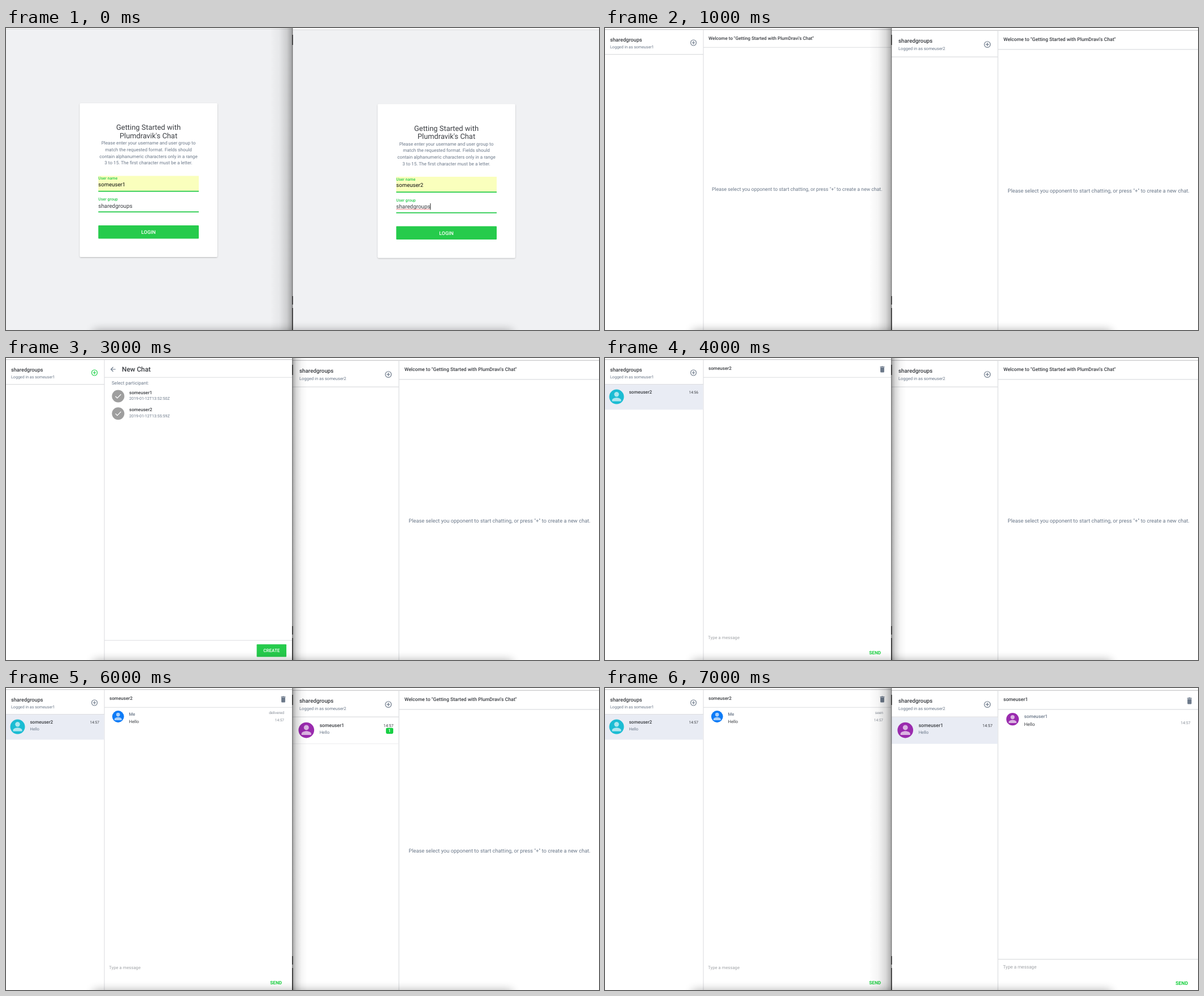
These frames come from a looping animation (1049 px wide and 534 px high, 8 s). An HTML page:

```html
<!DOCTYPE html>
<html lang="en">
<head>
<meta charset="utf-8">
<title>Two chat windows</title>
<style>
  html, body { margin: 0; width: 100%; height: 100%; overflow: hidden; background: #fff; }
  svg { display: block; width: 100vw; height: 100vh; }
  text { font-family: Roboto, Arial, sans-serif; text-rendering: geometricPrecision; white-space: pre; }
</style>
</head>
<body>
<svg id="stage" viewBox="0 0 1049 534" preserveAspectRatio="none">
  <defs>
    <linearGradient id="shade">
      <stop offset="0" stop-opacity="0"/>
      <stop offset=".4" stop-opacity=".04"/>
      <stop offset=".75" stop-opacity=".15"/>
      <stop offset="1" stop-opacity=".34"/>
    </linearGradient>
    <filter id="cardShadow" x="-10%" y="-10%" width="120%" height="120%">
      <feDropShadow dx="0" dy="1" stdDeviation="1" flood-opacity=".25"/>
    </filter>
    <filter id="soft" x="-10%" y="-150%" width="120%" height="400%">
      <feGaussianBlur stdDeviation="8"/>
    </filter>
  </defs>
</svg>
<script>
const LOOP = 8000;
const INK = '#3a3d42', SLATE = '#6b7889', GREEN = '#26cb4c', LINE = '#dcdde0';
const TEAL = '#1bbcd3', BLUE = '#0d7bf7', PURPLE = '#9a2bae';
const USERS = ['someuser1', 'someuser2'];
const GROUP = 'sharedgroups';
const stage = document.getElementById('stage');
const scenes = [];

function add(parent, tag, attrs = {}) {
  const el = document.createElementNS('http://www.w3.org/2000/svg', tag);
  for (const key in attrs) el.setAttribute(key, attrs[key]);
  parent.append(el);
  return el;
}
const group = (parent, transform = '') => add(parent, 'g', { transform });
const rect = (parent, x, y, width, height, fill, more) =>
  add(parent, 'rect', { x, y, width, height, fill, ...more });
const path = (parent, d, stroke, width, more) =>
  add(parent, 'path', { d, stroke, 'stroke-width': width, fill: 'none', ...more });

function text(parent, content, x, y, size, fill, weight = 400, anchor = 'start') {
  const el = add(parent, 'text', {
    x, y, fill, 'font-size': size, 'font-weight': weight, 'text-anchor': anchor
  });
  el.textContent = content;
}

// A group that is visible from one second to another.
function scene(parent, from, to) {
  const el = group(parent);
  scenes.push({ el, from, to });
  return el;
}

function avatar(parent, x, y, r, fill) {
  const g = group(parent, `translate(${x} ${y}) scale(${r / 13})`);
  add(g, 'circle', { r: 13, fill });
  const person = add(g, 'g', { fill: '#fff', opacity: .65 });
  add(person, 'circle', { cy: -4.3, r: 4.2 });
  add(person, 'path', { d: 'M-8 8V5.8C-8 3-2.8 1.6 0 1.6S8 3 8 5.8V8z' });
}

function checked(parent, x, y) {
  const g = group(parent, `translate(${x} ${y})`);
  add(g, 'circle', { r: 11, fill: '#9e9e9e' });
  path(g, 'M-4.8 .2L-1.6 3.4L5-3.3', '#fff', 1.3);
}

function plusIcon(parent, color) {
  path(parent, 'M151.5 26a5 5 0 1 0 10 0a5 5 0 1 0-10 0M153.7 26h5.6M156.5 23.2v5.6', color, 1.1);
}

function trash(parent, x, y) {
  add(parent, 'path', {
    transform: `translate(${x} ${y})`, fill: SLATE,
    d: 'M-3.9-4.9h2L-1.2-5.6h2.4l.7.7h2v1.3h-7.8zM-3.4-3h6.8v7.2q0 1.2-1.2 1.2h-4.4q-1.2 0-1.2-1.2z'
  });
}

function login(parent, user, typing) {
  rect(parent, 130.5, 133, 243.5, 272, '#fff', { rx: 2, filter: 'url(#cardShadow)' });
  text(parent, 'Getting Started with', 252, 180, 12.9, INK, 400, 'middle');
  text(parent, "Plumdravik's Chat", 252, 194.6, 12.9, INK, 400, 'middle');
  [
    'Please enter your username and user group to',
    'match the requested format. Fields should',
    'contain alphanumeric characters only in a range',
    '3 to 15. The first character must be a letter.'
  ].forEach((row, i) => text(parent, row, 252, 206 + i * 11.75, 8.17, SLATE, 400, 'middle'));

  rect(parent, 163.3, 261.5, 177.7, 27, '#faffbd');
  rect(parent, 163.3, 287.8, 177.7, 1.8, GREEN);
  text(parent, 'User name', 163.3, 268, 7.05, GREEN, 500);
  text(parent, user, 163.3, 279.8, 9.6, '#111');

  rect(parent, 163.3, 324.3, 177.7, 1.8, GREEN);
  text(parent, 'User group', 163.3, 305.2, 7.05, GREEN, 500);
  text(parent, GROUP, 163.3, 317.6, 9.85, INK);
  if (typing) {
    path(parent, 'M163.5 319h60', '#f0444a', 1, { 'stroke-dasharray': '1.2 .8' });
    path(parent, 'M223.8 308.5v11.5', '#111', .9);
  }

  rect(parent, 163.3, 349, 177.7, 23.5, GREEN, { rx: 1 });
  text(parent, 'LOGIN', 252, 364, 8.8, '#fff', 500, 'middle');
}

function frameOf(parent, user) {
  rect(parent, -3, 2, 515, 1.4, '#cfcfd1');
  path(parent, 'M174 3V540M-3 46.6H174M174 34.2H512', LINE, 1.1);
  text(parent, GROUP, 9, 23.5, 9.2, INK, 500);
  text(parent, 'Logged in as ' + user, 9, 35.5, 7.12, SLATE);
}

function welcome(parent, dx, dy) {
  text(parent, 'Welcome to "Getting Started with PlumDravi\'s Chat"', 183, 20.7, 8.14, INK, 500);
  text(parent, 'Please select you opponent to start chatting, or press "+" to create a new chat.',
    339.8 + dx, 288 + dy, 8.73, SLATE, 400, 'middle');
}

function contact(parent, { user, color, time, last, active, unread }) {
  if (active) rect(parent, -3, 47.1, 176.5, 44.2, '#e9ecf4');
  else path(parent, 'M-3 91.2H173.5', '#ececee', .9);
  avatar(parent, 20.5, 68.6, 13, color);
  text(parent, user, 42.4, 63.3, 8.15, INK, 500);
  text(parent, time, 165, 63, 6.65, INK, 400, 'end');
  if (last) text(parent, last, 42.4, 74.9, 7.2, SLATE);
  if (unread) {
    rect(parent, 152.5, 64.8, 12.1, 9.8, '#17cf43', { rx: 2 });
    text(parent, unread, 158.5, 72.3, 7.2, '#fff', 500, 'middle');
  }
}

function chatHeader(parent, user, dx) {
  text(parent, user, 183, 20.6, 8.14, INK, 500);
  trash(parent, 490.5 + dx, 20);
}

function composer(parent, dx, dy, message) {
  text(parent, message || 'Type a message', 182.3, 496.8 + dy, 7.7, message ? INK : '#a2a5a9');
  text(parent, 'SEND', 477.7 + dx, 524 + dy, 8.2, '#17d03e', 700, 'middle');
}

function message(parent, name, color, dx, status) {
  avatar(parent, 198.3, 50.5, 10.4, color);
  text(parent, name, 217.5, 48.6, 7.75, SLATE, 500);
  text(parent, 'Hello', 217.5, 61.7, 7.7, INK);
  text(parent, '14:57', 492 + dx, 59.2, 6.5, '#868d97', 400, 'end');
  if (status) text(parent, status, 492 + dx, 46.2, 6.7, '#868d97', 400, 'end');
}

function participants(parent, picked) {
  path(parent, 'M193.8 20h-8M189.6 16l-4 4l4 4', SLATE, 1.1);
  text(parent, 'New Chat', 205, 23.7, 11.8, INK, 500);
  text(parent, 'Select participant:', 187, 46.5, 8.2, SLATE);
  ['2019-01-12T13:52:50Z', '2019-01-12T13:55:59Z'].forEach((date, i) => {
    const y = i * 30.7;
    if (i === 0 || picked) checked(parent, 198.4, 67.5 + y);
    else avatar(parent, 198.4, 67.5 + y, 11, TEAL);
    text(parent, USERS[i], 218, 63.6 + y, 8.1, INK, 500);
    text(parent, date, 218, 74.1 + y, 7.1, SLATE);
  });
  path(parent, 'M174 499.3H506', LINE, 1.1);
  rect(parent, 443.5, 506.2, 52.5, 22.3, picked ? GREEN : '#83e197', { rx: 1 });
  text(parent, 'CREATE', 469.8, 520.3, 8, '#fff', 500, 'middle');
}

function buildLeft() {
  const intro = scene(stage, 0, 1);
  rect(intro, 0, 1.6, 507, 533, '#f0f1f3');
  rect(intro, 0, 1.2, 507, 1, '#d5d6d8');
  login(intro, USERS[0], false);

  const app = scene(stage, 1, 8);
  frameOf(app, USERS[0]);
  plusIcon(scene(app, 1, 2), SLATE);
  plusIcon(scene(app, 2, 4), '#17cf43');
  plusIcon(scene(app, 4, 8), SLATE);
  welcome(scene(app, 1, 2), 0, 0);
  participants(scene(app, 2, 3), false);
  participants(scene(app, 3, 4), true);

  const peer = { user: USERS[1], color: TEAL, active: true };
  contact(scene(app, 4, 6), { ...peer, time: '14:56' });
  contact(scene(app, 6, 8), { ...peer, time: '14:57', last: 'Hello' });
  chatHeader(scene(app, 4, 8), USERS[1], 0);
  composer(scene(app, 4, 5), 0, 0);
  composer(scene(app, 5, 6), 0, 0, 'Hello');
  composer(scene(app, 6, 8), 0, 0);
  message(scene(app, 6, 7), 'Me', BLUE, 0, 'delivered');
  message(scene(app, 7, 8), 'Me', BLUE, 0, 'seen');
}

function buildRight() {
  rect(stage, 507, 0, 542, 534, '#fff');
  const intro = scene(stage, 0, 1);
  rect(intro, 507, 3.2, 542, 531, '#f0f1f3');
  rect(intro, 507, 2.6, 542, 1, '#d5d6d8');
  login(group(intro, 'translate(527 1.5)'), USERS[1], true);

  // Same layout, zoomed a little more; dx and dy follow the window's far edges.
  const dx = 1.1, dy = -33;
  const app = group(scene(stage, 1, 8), 'translate(509.4 1.33) scale(1.067)');
  frameOf(app, USERS[1]);
  plusIcon(app, SLATE);
  welcome(scene(app, 1, 7), dx, dy / 2);

  const peer = { user: USERS[0], color: PURPLE, time: '14:57', last: 'Hello' };
  contact(scene(app, 6, 7), { ...peer, unread: '1' });
  const open = scene(app, 7, 8);
  contact(open, { ...peer, active: true });
  chatHeader(open, USERS[0], dx);
  message(open, USERS[0], PURPLE, dx);
  path(open, 'M174 448.2H512', LINE, 1.1);
  composer(open, dx, dy);
}

function buildEdges() {
  const shade = { fill: 'url(#shade)', width: 40, height: 534 };
  for (const [from, to] of [[0, 2], [7, 8]])
    add(scene(stage, from, to), 'rect', { ...shade, x: 467 });
  add(scene(stage, 2, 7), 'rect', { ...shade, width: 26, transform: 'translate(533 0) scale(-1 1)' });

  rect(stage, 506.1, 0, 1.2, 534, '#6e6e6e');
  for (const [y, height] of [[12, 18], [474, 15], [495, 39]])
    rect(stage, 506.1, y, 1.4, height, '#1c1c1c');
  rect(stage, 155, 534, 740, 30, '#000', { opacity: .3, filter: 'url(#soft)' });
}

function show(now) {
  const t = (now - start) % LOOP / 1000;
  for (const { el, from, to } of scenes)
    el.style.display = t >= from && t < to ? '' : 'none';
}

function tick() {
  show(performance.now());
  requestAnimationFrame(tick);
}

buildLeft();
buildRight();
buildEdges();
const start = performance.now();
tick();
</script>
</body>
</html>
```
